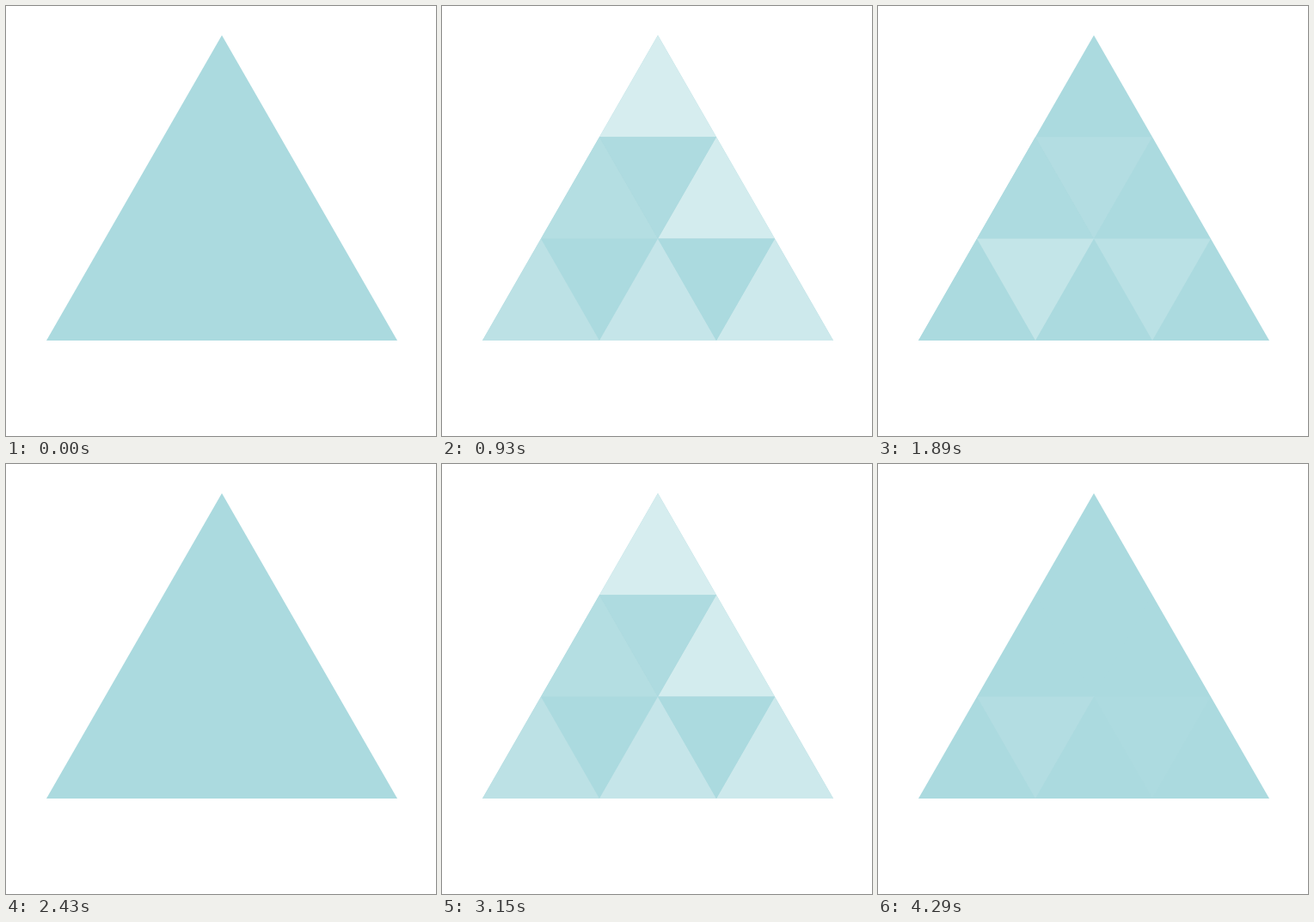
Recreate the animation shown at these times as an HTML page with a canvas. Size 500 by 500 pixels, loop 4.5 s.

```html
<!DOCTYPE html>
<html lang="en">
<head>
<meta charset="utf-8">
<title>Triangle loader</title>
<style>
  html, body { margin: 0; width: 100%; height: 100%; overflow: hidden; background: #fff; }
  canvas { display: block; width: 500px; height: 500px; }
</style>
</head>
<body>
<canvas id="stage" width="500" height="500"></canvas>
<script>
const ctx = document.getElementById('stage').getContext('2d');

const LOOP = 4500;
const CYCLE = 2220;
const BLANK_UNTIL = 210;
const BASE = [171, 218, 223];
const MAX_FADE = 0.51;

// Times within a cycle at which the pose advances.
const STEPS = [570, 750, 930, 1110, 1260, 1410, 1590, 1740, 1890, 2070];
const PHASE_START = 0.44;
const PHASE_STEP = 0.26;
const STAGGER = 0.1325;

// Lattice point: row 0 is the apex, row 3 the bottom edge.
const point = (row, col) => [251 + (col - row / 2) * 136, 34 + row * 118.3];
const up = (row, col) => [point(row, col), point(row + 1, col), point(row + 1, col + 1)];
const down = (row, col) => [point(row, col), point(row, col + 1), point(row + 1, col + 1)];

// Clockwise spiral from the apex inwards.
const tiles = [
  up(0, 0), up(1, 1), up(2, 2), up(2, 1), up(2, 0),
  up(1, 0), down(1, 0), down(2, 1), down(2, 0)
];
const outline = [point(0, 0), point(3, 0), point(3, 3)];

function fill(points, color) {
  ctx.fillStyle = color;
  ctx.beginPath();
  points.forEach(([x, y]) => ctx.lineTo(x, y));
  ctx.closePath();
  ctx.fill();
}

function tint(amount) {
  return `rgb(${BASE.map(c => Math.round(c + (255 - c) * amount)).join()})`;
}

function fadeAt(phase) {
  return phase <= 0 || phase >= 2 ? 0 : MAX_FADE * (1 - Math.cos(Math.PI * phase)) / 2;
}

function draw(ms) {
  const repeat = ms >= CYCLE;
  const local = repeat ? ms - CYCLE : ms;
  ctx.fillStyle = '#fff';
  ctx.fillRect(0, 0, 500, 500);
  if (repeat && local < BLANK_UNTIL) return;

  fill(outline, tint(0));
  const step = STEPS.filter(t => t <= local).length - 1;
  if (step < 0) return;
  tiles.forEach((tile, i) => {
    const fade = fadeAt(PHASE_START + PHASE_STEP * step - STAGGER * i);
    if (fade > 0) fill(tile, tint(fade));
  });
}

const start = performance.now();
function tick() {
  draw((performance.now() - start) % LOOP);
  requestAnimationFrame(tick);
}
tick();
</script>
</body>
</html>
```
